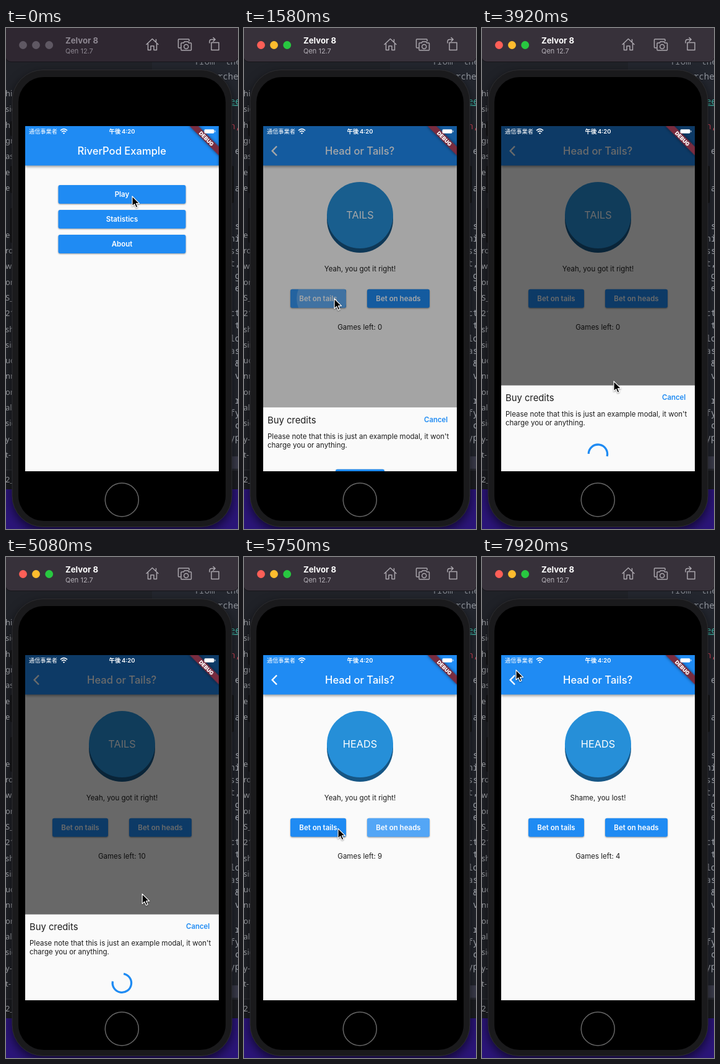
Animation of 375 by 807 pixels, one loop 8000 ms. Source, as an HTML page:

```html
<!DOCTYPE html>
<html lang="en">
<head>
<meta charset="utf-8">
<title>Coin game demo</title>
<style>
  html, body { margin: 0; width: 100%; height: 100%; overflow: hidden; background: #202228; }
  svg { display: block; }
  text { font-family: Inter, "Noto Sans CJK JP", "Noto Sans CJK", sans-serif; white-space: pre; }
  .mid { text-anchor: middle; }
  .code text { font-family: "Noto Sans Mono", monospace; font-size: 14px; }
  .files text { font-family: "Noto Sans", sans-serif; font-size: 13px; fill: #a2a4a9; }
  .raised { filter: drop-shadow(0 1.5px 1.2px #0006); }
  .bar { filter: drop-shadow(0 2px 2px #0006); }
  .device { filter: drop-shadow(0 6px 8px #0009); }
  .line { fill: none; stroke: #aaa6ad; stroke-width: 1.5; stroke-linejoin: round; stroke-linecap: round; }
</style>
</head>
<body>
<svg id="stage" width="375" height="807" viewBox="0 0 375 807"></svg>
<script>
const LOOP = 8000, BLUE = '#1f8bf3';
const SCREEN = 'x="31" y="158" width="313" height="556"';

// ---------- markup helpers ----------
// Text whose capitals are centred vertically on cy.
const text = (x, cy, size, str, attrs = '') =>
  `<text x="${x}" y="${(cy + size * .364).toFixed(2)}" font-size="${size}" ${attrs}>${str}</text>`;

const buttons = {};
function button(id, x, y, w, label) {
  buttons[id] = { cx: x + w / 2, cy: y + 15, radius: Math.hypot(w, 30) / 2 };
  const box = `x="${x}" y="${y}" width="${w}" height="30" rx="3"`;
  return `<clipPath id="${id}-clip"><rect ${box}/></clipPath>
    <rect class="raised" ${box} fill="${BLUE}"/>
    <g id="${id}-ink" clip-path="url(#${id}-clip)" fill="#fff" opacity="0">
      <rect ${box} opacity=".1"/><circle opacity=".22"/></g>
    ${text(x + w / 2, y + 14.7, 11.5, label, 'class="mid" font-weight="600" fill="#fff"')}`;
}

const page = (id, title, body) => `<g id="${id}">
  <rect ${SCREEN} fill="#fafafa"/>
  <rect class="bar" x="31" y="158" width="313" height="63.5" fill="${BLUE}"/>
  ${text(187.2, 198, 16.6, title, 'class="mid" font-weight="500" fill="#fff"')}${body}</g>`;

// Evenly spaced fragments of text behind the device; a dot leaves a row empty.
const column = (x, y, step, words, width = 0) => words.split(' ').map((w, i) => w === '.' ? '' :
  `<text x="${x}" y="${y + i * step}">${w.padStart(width, '\u00a0').replace('&', '&amp;')}</text>`).join('');

// ---------- scene ----------
const desktop = `
  <rect width="375" height="807" fill="#202228"/>
  <rect x="236" y="54" width="139" height="658" fill="#23262e"/>
  <rect y="712" width="375" height="31" fill="#1c1d22"/>
  <path d="M0 712H375" stroke="#34363c"/>
  <rect y="743" width="375" height="64" fill="#2b1579"/>
  <rect x="355" y="690" width="20" height="20" fill="#3b3c4c"/>
  <g class="files">
    ${column(-1, 110, 25.3, 'hi sig ha gr as er er . . e- ro wa or S_ 21 sh sin uc nr or al sig y- t-')}
    ${column(-1, 732, 25, '2_')}
  </g>
  <g class="code" fill="#aeb2ba">
    <text x="304" y="59" fill="#80848c">from  the</text><text x="342" y="83" fill="#90949c">rches</text>
    <text x="362" y="123" fill="#3fb8a8" text-decoration="underline">ee</text>
    <text x="362" y="163" fill="#d6485a">n,</text>
    ${column(361.5, 203, 20.1, 'e . . a . . s hi ss t, g e . ct t lo as & v . r fy c yp', 2)}
  </g>`;

const toolbar = `
  <rect id="toolbar" x="-1" y="-12" width="377" height="66.5" rx="9" stroke="#17151a"/>
  <g id="lights"><circle cx="27.5" cy="27.5" r="6.4"/><circle cx="48.5" cy="27.5" r="6.4"/><circle cx="69.7" cy="27.5" r="6.4"/></g>
  ${text(96, 20.5, 13.2, 'Zelvor 8', 'id="device" font-weight="700"')}
  ${text(96, 36.5, 11, 'Qen 12.7', 'id="system"')}
  <g class="line">
    <path d="M227 26.5L236.5 17.5 246 26.5M229.5 25V35.5H234V29H239V35.5H243.5V25M242.5 22V18.5"/>
    <path d="M282 32H279.5Q278.5 32 278.5 31V19Q278.5 18 279.5 18H295Q296 18 296 19V21"/>
    <path d="M284 24H287L288.5 22H294L295.5 24H298.5Q299.5 24 299.5 25V35Q299.5 36 298.5 36H284Q283 36 283 35V25Q283 24 284 24Z"/>
    <circle cx="291.2" cy="30" r="3.5"/>
    <path d="M332 23.5H344V35.5H332ZM329 24V22Q329 18.5 332.5 18.5H338M335 15.5L338.2 18.5 335 21.5"/>
  </g>`;

const phone = `
  <g fill="#141416"><rect x="7" y="150" width="5" height="24" rx="2"/><rect x="7" y="222" width="5" height="44" rx="2"/>
    <rect x="7" y="290" width="5" height="56" rx="2"/><rect x="363" y="222" width="5" height="60" rx="2"/></g>
  <rect class="device" x="10" y="67.5" width="355" height="736" rx="50" fill="#1a1a1c" stroke="#2d2d30"/>
  <rect x="20" y="79" width="335" height="715" rx="41" fill="#000"/>
  <circle cx="187.3" cy="760" r="27" fill="none" stroke="#666" stroke-width="1.5"/>`;

const homePage = page('home', 'RiverPod Example',
  button('play', 84.5, 253, 206, 'Play') +
  button('stats', 84.5, 293, 206, 'Statistics') +
  button('about', 84.5, 333, 206, 'About'));

const gamePage = page('game', 'Head or Tails?', `
  <path d="M53 190.5L45.7 198 53 205.5" fill="none" stroke="#fff" stroke-width="2.4"/>
  <circle cx="187.5" cy="308.5" r="53.5" fill="#165685"/>
  <circle cx="187.5" cy="301.5" r="53.5" fill="#268fd8"/>
  ${text(187.5, 301.5, 16.3, '', 'id="face" class="mid" fill="#fff"')}
  ${text(187.5, 388, 11.5, '', 'id="message" class="mid" fill="#1c1c1c"')}
  ${text(187.3, 482.2, 11.5, '', 'id="games" class="mid" fill="#1c1c1c"')}
  ${button('tails', 75, 420.7, 90, 'Bet on tails')}
  ${button('heads', 199, 420.7, 101, 'Bet on heads')}`);

const sheet = `<rect id="scrim" ${SCREEN}/>
  <g id="sheet">
    <rect x="31" y="566" width="313" height="150" fill="#fafafa"/>
    ${text(38, 586, 14.8, 'Buy credits', 'fill="#1c1c1c"')}
    ${text(310.2, 585.3, 11.4, 'Cancel', `class="mid" font-weight="600" fill="${BLUE}"`)}
    ${text(38, 612.2, 11.5, "Please note that this is just an example modal, it won't", 'fill="#1c1c1c"')}
    ${text(38, 626.5, 11.5, 'charge you or anything.', 'fill="#1c1c1c"')}
    <g id="buy">${button('purchase', 148, 665.6, 79, 'Purchase')}</g>
    <path id="spinner" fill="none" stroke="${BLUE}" stroke-width="3.3"/>
  </g>`;

const statusBar = `
  <g transform="translate(344 158) rotate(45)">
    <rect x="-33.4" y="23.4" width="66.8" height="10" fill="#792c3f" style="filter:drop-shadow(0 0 2.5px #0008)"/>
    ${text(0, 28.5, 8.5, 'DEBUG', 'class="mid" font-weight="900" fill="#fff"')}
  </g>
  <g fill="#fff">
    ${text(37, 166.5, 9.2, '通信事業者')}
    ${text(187.5, 166.5, 9.5, '午後\u20094:20', 'class="mid" font-weight="600"')}
    <path d="M88 165.2Q93.5 160.2 99 165.2M90 167.5Q93.5 164.3 97 167.5" fill="none" stroke="#fff" stroke-width="1.6"/>
    <path d="M91.8 169.2Q93.5 167.8 95.2 169.2L93.5 171Z"/>
    <rect x="320.5" y="163.3" width="16" height="6.4" rx="1.6"/>
    <rect x="337.5" y="165.3" width="1" height="2.4"/>
  </g>`;

const pointer = `<path id="pointer" d="M0 0V16L3.7 12.6 6.3 18.4 9 17.2 6.5 11.6H11.6Z"
  fill="#000" stroke="#fff" stroke-width="1.2" stroke-linejoin="round" style="filter:drop-shadow(0 1px 1px #0006)"/>`;

document.getElementById('stage').innerHTML = desktop + phone + toolbar +
  `<clipPath id="screen"><rect ${SCREEN}/></clipPath>
   <g clip-path="url(#screen)">${homePage}${gamePage}${sheet}${statusBar}</g>` + pointer;

// ---------- timing ----------
const clamp = x => Math.min(1, Math.max(0, x));
const smooth = x => x * x * (3 - 2 * x);
const lerp = (a, b, k) => a + (b - a) * k;

function bezier(x1, y1, x2, y2) {
  const at = (a, b, s) => 3 * a * s * (1 - s) ** 2 + 3 * b * s * s * (1 - s) + s ** 3;
  return x => {
    if (x <= 0 || x >= 1) return clamp(x);
    let low = 0, high = 1;
    for (let i = 0; i < 24; i++) {
      const s = (low + high) / 2;
      if (at(x1, x2, s) < x) low = s; else high = s;
    }
    return at(y1, y2, low);
  };
}
const ease = bezier(.25, .1, .25, 1);
const decelerate = bezier(0, 0, .2, 1);
const slide = bezier(.35, .91, .33, .97);
const fastOutSlowIn = bezier(.4, 0, .2, 1);

const ACTIVE = 150, PUSH = 290, OPEN = 1495, BUY = 3075, CLOSE = 5086;

// time, x, y
const pointerPath = [
  [0, 204, 271], [830, 204, 271], [1380, 146, 436], [1620, 146, 436], [2080, 201, 586],
  [2500, 212, 678], [3150, 212, 678], [3850, 213, 569], [5000, 213, 569], [5250, 242, 462],
  [5420, 251, 440], [5560, 251, 440], [5800, 140, 437], [6150, 140, 437], [6340, 251, 439],
  [6800, 251, 439], [7070, 140, 437], [7250, 140, 437], [7850, 55, 182], [LOOP, 55, 182]];

const taps = [[160, 'play'], [1435, 'tails'], [2995, 'purchase'], [5500, 'heads'], [5850, 'tails'],
  [6100, 'tails'], [6360, 'heads'], [6720, 'heads'], [7120, 'tails']];

// time, games left, coin face, bet won
const rounds = [[0, 0, 'TAILS', true], [BUY + 2000, 10, 'TAILS', true], [5600, 9, 'HEADS', true],
  [5950, 8, 'HEADS', false], [6190, 7, 'TAILS', true], [6530, 6, 'TAILS', false],
  [6810, 5, 'HEADS', true], [7210, 4, 'HEADS', false]];

function pointerAt(t) {
  const i = pointerPath.findIndex(k => k[0] > t);
  const [t0, x0, y0] = pointerPath[i - 1], [t1, x1, y1] = pointerPath[i];
  const k = smooth((t - t0) / (t1 - t0));
  return [lerp(x0, x1, k), lerp(y0, y1, k)];
}

// ---------- drawing ----------
const el = id => document.getElementById(id);
const set = (node, attrs) => { for (const k in attrs) node.setAttribute(k, attrs[k]); };
const show = (id, on) => set(el(id), { display: on ? 'inline' : 'none' });
const move = (id, x, y) => set(el(id), { transform: `translate(${x.toFixed(2)} ${y.toFixed(2)})` });

function drawToolbar(active) {
  set(el('toolbar'), { fill: active ? '#37313a' : '#2f2731' });
  set(el('device'), { fill: active ? '#fff' : '#8d8791' });
  set(el('system'), { fill: active ? '#b5b1b8' : '#8d8791' });
  const colors = active ? ['#fe5f57', '#febc2e', '#28c840'] : Array(3).fill('#5f5863');
  [...el('lights').children].forEach((light, i) => set(light, { fill: colors[i] }));
}

function drawInk(id, t) {
  const tap = taps.filter(([at, name]) => name === id && at <= t).pop();
  const age = tap ? t - tap[0] : 1e4;
  const ink = el(id + '-ink');
  set(ink, { opacity: clamp(age / 75) * clamp((450 - age) / 250) });
  if (age > 450) return;
  const { cx, cy, radius } = buttons[id], [x, y] = pointerAt(tap[0]);
  const k = ease(clamp(age / 300));
  set(ink.lastElementChild, { cx: lerp(x, cx, k), cy: lerp(y, cy, k), r: radius * (.3 + .7 * k) });
}

function drawSpinner(age) {
  const cycle = age / 1333 % 1;
  const head = fastOutSlowIn(clamp(cycle * 2)), tail = fastOutSlowIn(clamp(cycle * 2 - 1));
  const start = Math.PI * (-.5 + 1.5 * tail + 2 * age / 2222 + .5 * cycle);
  const sweep = Math.max(1.5 * Math.PI * (head - tail), .01);
  const point = a => `${187.4 + 15.2 * Math.cos(a)} ${676.5 + 15.2 * Math.sin(a)}`;
  set(el('spinner'), { d: `M${point(start)}A15.2 15.2 0 ${+(sweep > Math.PI)} 1 ${point(start + sweep)}` });
}

function drawSheet(t) {
  const buying = t >= BUY;
  const value = t < CLOSE ? clamp((t - OPEN) / 250) : clamp(1 - (t - CLOSE) / 200);
  set(el('scrim'), { opacity: .58 * ease(value) });
  show('sheet', value > 0);
  move('sheet', 0, 148 - (buying ? 138.3 : 147.5) * decelerate(value));
  show('buy', !buying);
  show('spinner', buying);
  if (buying) drawSpinner(t - BUY);
}

function draw(t) {
  drawToolbar(t >= ACTIVE);
  const pushed = slide(clamp((t - PUSH) / 400));
  move('home', -313 / 3 * pushed, 0);
  move('game', 313 * (1 - pushed), 0);
  const [, left, face, won] = rounds.filter(r => r[0] <= t).pop();
  el('face').textContent = face;
  el('message').textContent = won ? 'Yeah, you got it right!' : 'Shame, you lost!';
  el('games').textContent = 'Games left: ' + left;
  Object.keys(buttons).forEach(id => drawInk(id, t));
  drawSheet(t);
  move('pointer', ...pointerAt(t));
}

function tick() {
  draw(performance.now() % LOOP);
  requestAnimationFrame(tick);
}
tick();
</script>
</body>
</html>
```
